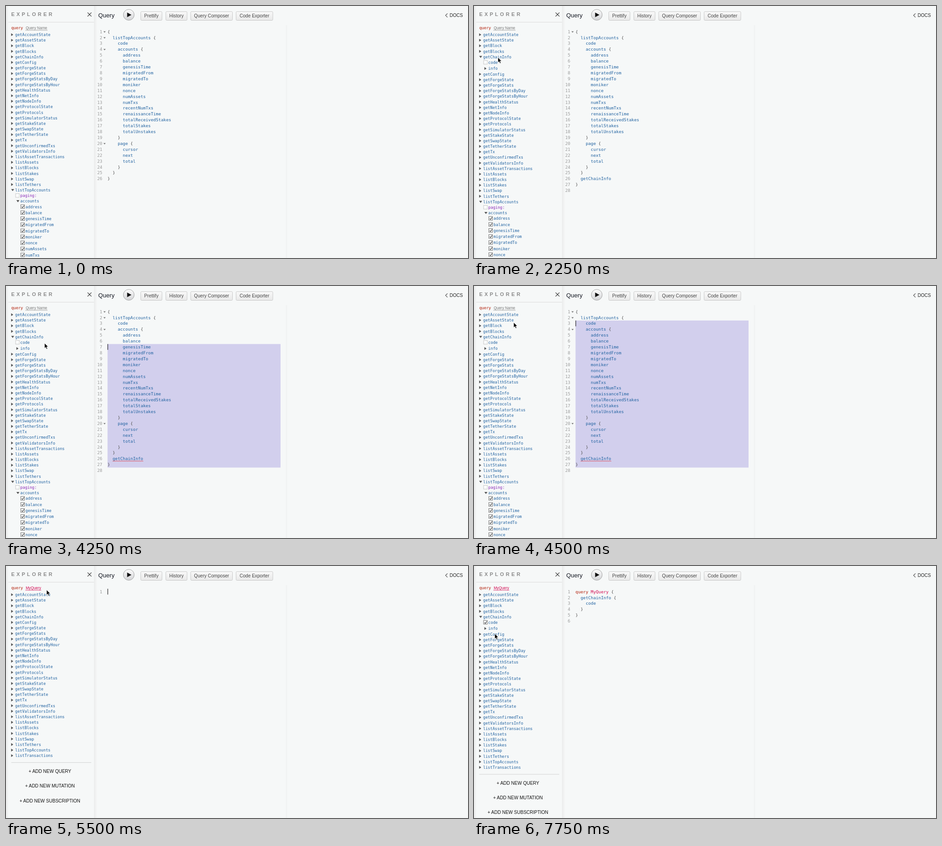
Write an HTML page that moves like this. It is 1013 by 553 pixels and loops after 8 s.

```html
<!DOCTYPE html>
<html lang="en">
<head>
<meta charset="utf-8">
<title>Query explorer</title>
<style>
  html, body { margin: 0; width: 100%; height: 100%; overflow: hidden; background: #f6f8f8; }
  svg { display: block; width: 1013px; height: 553px; }
  text { white-space: pre; font-family: "Liberation Sans", Arial, sans-serif; }
  .tree, .code, .num { font-family: "DejaVu Sans Mono", Menlo, monospace; }
  .tree { font-size: 8.58px; }
  .code, .num { font-size: 9.27px; }
  .num { fill: #999; text-anchor: end; }
  .field { fill: #1f61a0; }
  .punct { fill: #555; }
  .word { fill: #b11a04; }
  .def { fill: #d2054e; }
  .arg { fill: #8b2bb9; }
  .name { font-size: 8.3px; }
  .btn { font-size: 10.1px; fill: #444; text-anchor: middle; }
  .add { font-size: 10px; fill: #111; text-anchor: middle; }
  .tri { fill: #555; }
</style>
</head>
<body>
<svg viewBox="0 0 1013 553" xmlns="http://www.w3.org/2000/svg">
  <defs>
    <linearGradient id="edge"><stop stop-color="#ececec"/><stop offset="1" stop-color="#f3f5f5"/></linearGradient>
    <linearGradient id="split"><stop stop-color="#ebebeb"/><stop offset="1" stop-color="#f6f8f8"/></linearGradient>
    <linearGradient id="face" x2="0" y2="1"><stop stop-color="#f9f9f9"/><stop offset="1" stop-color="#e9e9e9"/></linearGradient>
    <linearGradient id="knob" x2="0" y2="1"><stop stop-color="#fdfdfd"/><stop offset="1" stop-color="#d2d3d6"/></linearGradient>
  </defs>
  <rect width="1013" height="553" fill="#f6f8f8"/>
  <rect width="5" height="553" fill="url(#edge)"/>
  <rect x="193" width="7" height="553" fill="url(#split)"/>
  <rect x="613.5" y="42" width="3" height="511" fill="#f1f3f3"/>
  <text x="11.5" y="22.3" font-size="11" font-weight="bold" letter-spacing="4.2" fill="#8b8b8b" id="title">EXPLORER</text>
  <path d="M178.8 14.3l8.6 8.6m0-8.6l-8.6 8.6" stroke="#333" stroke-width="1.2"/>
  <path d="M5 35.5H193" stroke="#dcdcdc"/>
  <text x="202.3" y="24.6" font-size="13.1" fill="#141823">Query</text>
  <circle cx="269.2" cy="19.4" r="11.9" fill="url(#knob)" stroke="#999" stroke-width=".9"/>
  <path d="M265.6 14.2V24.6L275 19.4Z" fill="#111"/>
  <g id="bar"></g>
  <path d="M968 16.4l-4.2 4.2 4.2 4.2" fill="none" stroke="#444" stroke-width="1.1"/>
  <text x="972.8" y="24.2" font-size="10" fill="#222">DOCS</text>
  <g id="live"></g>
  <path id="mouse" d="M0 0V11.2L2.6 8.8 4.5 12.9 6.4 12 4.5 8H8Z" fill="#000" stroke="#fff" stroke-width=".7"/>
</svg>
<script>
const $ = id => document.getElementById(id);
const LOOP = 8000, STEP = 250;
const OPEN = 2250, LINT = 2750, CLEAR = 5500, REOPEN = 7000, CHECK = 7750;

const queries = ("getAccountState getAssetState getBlock getBlocks getChainInfo getConfig getForgeState " +
  "getForgeStats getForgeStatsByDay getForgeStatsByHour getHealthStatus getNetInfo getNodeInfo " +
  "getProtocolState getProtocols getSimulatorStatus getStakeState getSwapState getTetherState getTx " +
  "getUnconfirmedTxs getValidatorsInfo listAssetTransactions listAssets listBlocks listStakes listSwap " +
  "listTethers listTopAccounts listTransactions").split(" ");
const fields = ("address balance genesisTime migratedFrom migratedTo moniker nonce numAssets numTxs " +
  "recentNumTxs renaissanceTime totalReceivedStakes totalStakes totalUnstakes").split(" ");

const topQuery = ["{", "  listTopAccounts {", "    code", "    accounts {",
  ...fields.map(f => "      " + f), "    }", "    page {",
  "      cursor", "      next", "      total", "    }", "  }"];

// Pointer path: time, x, y
const path = [
  [250, 200, 147], [500, 150, 116], [750, 95, 102], [1000, 62, 109], [1250, 52.5, 113],
  [2500, 52.5, 113], [2750, 110, 85], [3000, 205, 130], [3250, 258, 290], [3500, 270, 400],
  [3750, 270, 424], [4000, 266, 412], [4250, 84.5, 125.5], [4500, 87, 80], [4750, 89, 52.5],
  [5500, 89, 52.5], [6250, 62, 98], [6500, 52.5, 113], [7000, 52.5, 113],
  [7500, 25, 124], [7750, 45.5, 148.8]
];

const text = (cls, x, y, s) => `<text class="${cls}" x="${x}" y="${y}">${s}</text>`;
const line = (x1, x2, y, color) => `<path d="M${x1} ${y}H${x2}" stroke="${color}" stroke-width=".8"/>`;

function twist(x, y, open) {
  const d = open ? `M${x} ${y - 2.2}h6.6l-3.3 4.6z` : `M${x} ${y - 3.2}v6.4l4.6-3.2z`;
  return `<path class="tri" d="${d}"/>`;
}

function box(x, y, on) {
  const tick = on ? `<path d="M${x + 1.8} ${y}l2 2.2 3.4-4.8" fill="none" stroke="#333" stroke-width="1.1"/>` : "";
  return `<rect x="${x}" y="${y - 4.4}" width="8.2" height="8.2" fill="#fafbfb" stroke="${on ? "#666" : "#c4c4c4"}" stroke-width=".9"/>` + tick;
}

function tree(t) {
  const named = t >= CLEAR;
  const chainOpen = (t >= OPEN && !named) || t >= REOPEN;
  let y = 62.9, out = text("tree word", 11.4, 51, "query");
  out += named
    ? text("name def", 43.2, 51, "MyQuery") + line(42.5, 77.3, 53, "#d2054e")
    : text("name", 43.2, 51, '<tspan fill="#777">Query Name</tspan>') + line(42.5, 91, 53, "#888");
  const row = (mark, x, label, step = 12.18, cls = "field") => {
    out += mark + text("tree " + cls, x, y + 3.1, label);
    y += step;
  };
  for (const q of queries) {
    const topOpen = q === "listTopAccounts" && !named;
    const open = topOpen || (q === "getChainInfo" && chainOpen);
    row(twist(11.3, y, open), 20, q);
    if (topOpen) {
      row(box(21, y, false), 31.3, "paging:", 12.18, "arg");
      row(twist(22.8, y, true), 31.3, "accounts");
      for (const f of fields) row(box(32.4, y, true), 42.8, f, 13.25);
      break;
    }
    if (open) {
      row(box(21, y, t >= CHECK), 31.3, "code", 13.35);
      row(twist(22.8, y, false), 31.3, "info", 12.45);
    }
  }
  if (named) {
    const last = y - 12.18;
    out += line(11.5, 187, last + 15.2, "#c8c8c8");
    ["QUERY", "MUTATION", "SUBSCRIPTION"].forEach((s, i) =>
      out += text("add", 96.3, last + 37.9 + i * 32.25, "+ ADD NEW " + s));
  }
  return out;
}

function source(t) {
  if (t < OPEN) return [...topQuery, "}"];
  if (t < CLEAR) return [...topQuery, "  getChainInfo", "}", ""];
  if (t < REOPEN) return [""];
  if (t < CHECK) return ["query MyQuery {", "  getChainInfo", "}", ""];
  return ["query MyQuery {", "  getChainInfo {", "    code", "  }", "}", ""];
}

const paint = s => s.replace(/\w+|[{}]/g, w => {
  const cls = w === "query" ? "word" : w === "MyQuery" ? "def" : /\w/.test(w) ? "field" : "punct";
  return `<tspan class="${cls}">${w}</tspan>`;
});

function squiggle(x, y, width) {
  let d = `M${x} ${y}`;
  for (let i = 0; i < width / 2.8; i++) d += "l1.4-1.3l1.4 1.3";
  return `<path d="${d}" fill="none" stroke="#e0242b" stroke-width=".8"/>`;
}

function editor(t) {
  const pitch = 12.91, char = 5.58, left = 222.6;
  const top = i => 49.9 + i * pitch;
  const caret = i => `<rect x="222.6" y="${top(i)}" width="1.1" height="12.7" fill="#111"/>`;
  const lines = source(t);
  let out = "";
  if (t >= 4250 && t < CLEAR) {
    const first = t < 4500 ? 6 : t < 4750 ? 2 : 0;
    out += `<rect x="222.6" y="${top(first)}" width="379.4" height="${top(27) - top(first)}" fill="#d2cfed"/>`;
    if (t < 5250) out += caret(first);
  }
  lines.forEach((s, i) => {
    const y = top(i) + 9.7, indent = s.search(/\S|$/);
    out += text("num", 211.2, y, i + 1) + text("code", left + indent * char, y, paint(s.trim()));
    const folds = s.endsWith("{") && t < CLEAR && (i === 0 || t < OPEN || t >= LINT);
    if (folds) out += `<path d="M213.6 ${top(i) + 5.6}h5l-2.5 3z" fill="#777"/>`;
  });
  if (t >= LINT && t < CLEAR) out += squiggle(left + 2 * char, top(25) + 12.2, 12 * char);
  if (t >= CLEAR && t < REOPEN && (t - CLEAR) % 1000 < 500) out += caret(0);
  return out;
}

function movePointer(t) {
  const next = path.findIndex(p => p[0] > t);
  const b = path[next < 0 ? path.length - 1 : next];
  const a = next < 0 ? b : path[Math.max(next - 1, 0)];
  const k = a === b ? 0 : (t - a[0]) / (b[0] - a[0]);
  const mix = n => a[n] + (b[n] - a[n]) * k;
  $("mouse").setAttribute("transform", `translate(${mix(1)} ${mix(2)})`);
  $("mouse").style.display = t < path[0][0] ? "none" : "";
}

const button = (x, end, s) =>
  `<rect x="${x + .5}" y="12.3" width="${end - x - 1}" height="19.2" rx="2" fill="url(#face)" stroke="#c3c3c3" stroke-width=".9"/>` +
  text("btn", (x + end) / 2, 25.3, s);
$("bar").innerHTML = button(295, 342.5, "Prettify") + button(350, 397.5, "History") +
  button(404.5, 497, "Query Composer") + button(504, 585.5, "Code Exporter");

let shown = -1;
const start = performance.now();
function draw() {
  const t = Math.floor((performance.now() - start) % LOOP / STEP) * STEP;
  if (t !== shown) {
    shown = t;
    $("live").innerHTML = tree(t) + editor(t);
    movePointer(t);
  }
  requestAnimationFrame(draw);
}
draw();
</script>
</body>
</html>
```
